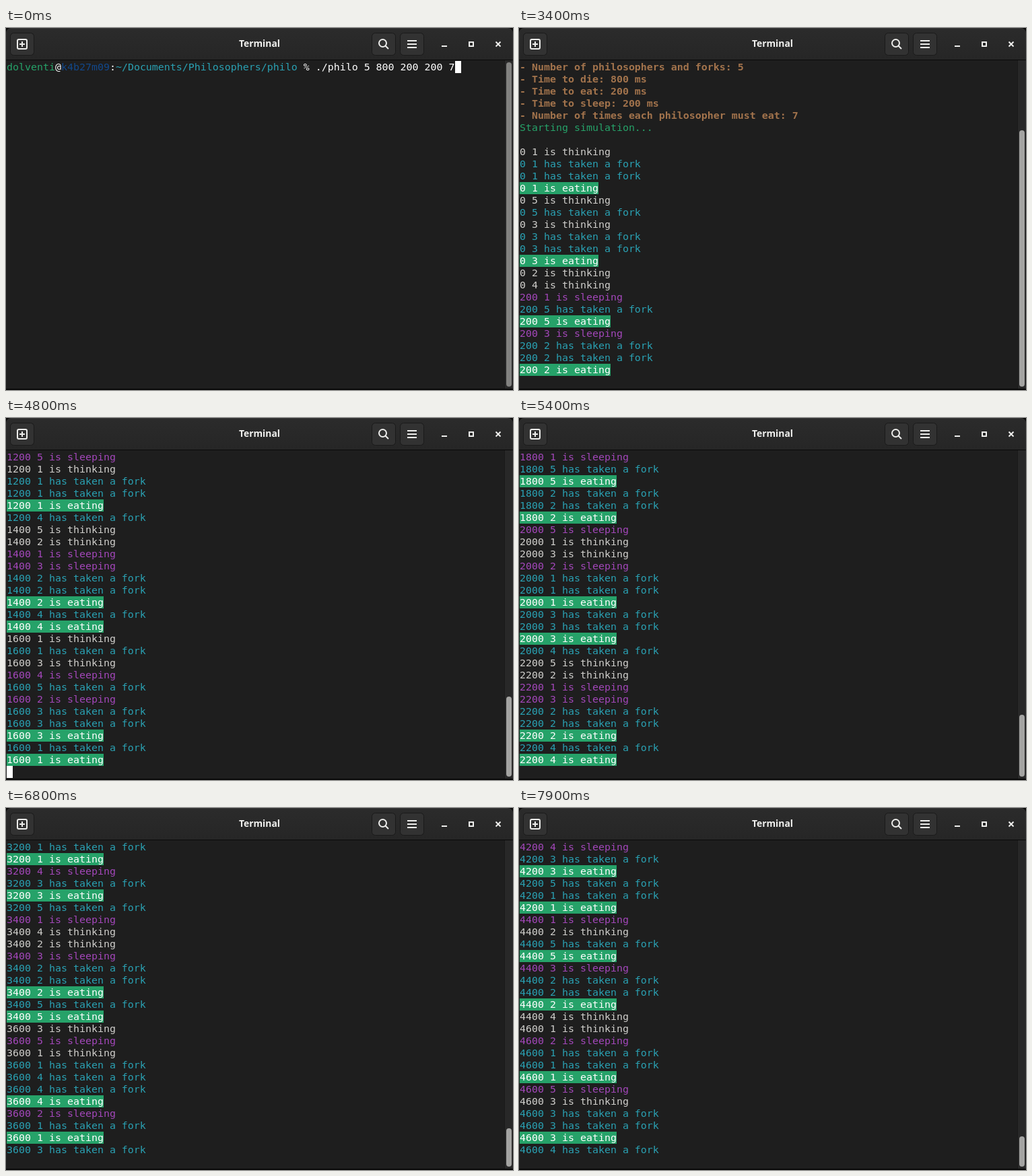
An HTML page for the animation above (8000 ms loop, 753 by 538 pixels).

```html
<!DOCTYPE html>
<html lang="en">
<head>
<meta charset="utf-8">
<title>Terminal</title>
<style>
  html, body { margin: 0; width: 100%; height: 100%; overflow: hidden; background: #000; }
  #window { position: absolute; left: 0; top: 0; width: 753px; height: 538px; overflow: hidden; background: #0a0a0a; }
  #header {
    position: absolute; left: 0; top: 0; width: 753px; height: 47px; box-sizing: border-box;
    border-top: 1px solid #373737; border-radius: 8px 8px 0 0;
    background: linear-gradient(#2b2b2b, #262626);
  }
  #title {
    position: absolute; left: 0; top: 13px; width: 753px; line-height: 20px; text-align: center;
    color: #f0f0ee; font: bold 13.9px/20px "Noto Sans", "Open Sans", sans-serif;
  }
  #icons { position: absolute; left: 0; top: 0; }
  #screen {
    position: absolute; left: 0; top: 48px; width: 740px; height: 488px; background: #1e1e1e;
  }
  #rows {
    position: absolute; left: 1px; top: 1px; white-space: pre; color: #fff;
    font: 14.95px/18px "DejaVu Sans Mono", monospace;
  }
  #rows div { height: 18px; }
  #rows span { display: inline-block; height: 18px; vertical-align: top; }
  #cursor { position: absolute; width: 9px; height: 18px; background: #fff; }
  #trough {
    position: absolute; left: 740px; top: 48px; width: 12px; height: 488px;
    background: #282828; border-left: 1px solid #1a1a1a;
  }
  #slider { position: absolute; left: 743px; bottom: 5px; width: 8px; border-radius: 4px; }
  #rows .green { color: #26a269; }
  #rows .blue { color: #12488b; }
  #rows .cyan { color: #2aa1b3; }
  #rows .magenta { color: #a347ba; }
  #rows .yellow { color: #a2734c; }
  #rows .gray { color: #d0cfcc; }
  #rows .badge { background: #26a269; color: #fff; }
  #rows .bold { font-weight: bold; }
</style>
</head>
<body>
<div id="window">
  <div id="header"></div>
  <div id="title">Terminal</div>
  <svg id="icons" width="753" height="48" fill="none" stroke="#eeeeec" stroke-width="2">
    <g fill="#323232" stroke="#1a1a1a" stroke-width="1">
      <rect x="6.5" y="7.5" width="35" height="33" rx="5"/>
      <rect x="543.5" y="7.5" width="35" height="33" rx="5"/>
      <rect x="585.5" y="7.5" width="35" height="33" rx="5"/>
    </g>
    <rect x="17" y="17" width="14" height="14" rx="2"/>
    <path d="M20 24h8M24 20v8"/>
    <circle cx="559.5" cy="22.5" r="5.5"/>
    <path d="M563.5 26.500l4.500 4.500"/>
    <path d="M596 19h14M596 24h14M596 29h14"/>
    <path d="M647 27h8"/>
    <rect x="688" y="21" width="6" height="6"/>
    <path d="M727.500 20.500l7 7M734.500 20.500l-7 7"/>
  </svg>
  <div id="screen">
    <div id="rows"></div>
    <div id="cursor"></div>
  </div>
  <div id="trough"></div>
  <div id="slider"></div>
</div>
<script>
const LOOP = 8000, BLINK = 600, ENTER = 1200, LOG_START = 3200, TICK = 200;
const ROWS = 27, CELL_W = 9, CELL_H = 18;

const $ = id => document.getElementById(id);
const styled = (style, text) => `<span class="${style}">${text}</span>`;

const command = " % ./philo 5 800 200 200 7";
const user = "dolventi", host = "k4b27m09", path = "~/Documents/Philosophers/philo";
const prompt = styled("green", user) + "@" + styled("blue", host) + ":" + styled("cyan", path) + command;
const promptLength = `${user}@${host}:${path}${command}`.length;

const rule = styled("blue", "=".repeat(46));
const banner = [
  "", rule, styled("magenta bold", "WELCOME TO THE DINING PHILOSOPHERS SIMULATION!"), rule, "",
  styled("cyan", "Details of the simulation:"),
  ...[
    "Number of philosophers and forks: 5",
    "Time to die: 800 ms",
    "Time to eat: 200 ms",
    "Time to sleep: 200 ms",
    "Number of times each philosopher must eat: 7"
  ].map(text => styled("yellow bold", "- " + text)),
  styled("green", "Starting simulation..."), ""
];

const actions = {
  t: ["gray", "is thinking"],
  f: ["cyan", "has taken a fork"],
  e: ["badge", "is eating"],
  s: ["magenta", "is sleeping"]
};

// One entry per 200 ms of the simulation: philosopher, then action.
const ticks = `
  1t1f1f1e5t5f3t3f3f3e2t4t
  1s5f5e3s2f2f2e
  5s1t4f4f4e3t2s1f1f1e3f
  5t4s3f3e1s5f5f5e2t2f
  3s4t1t5s4f4f4e1f1f1e
  3t5t1s2f2e4s5f5f5e
  2s4t3f3f3e5s1t1f1f1e4f
  5t2t1s3s2f2f2e4f4e
  1t1f3t4s5f2s3f3f3e1f1e
  4t2t3s1s5f5e2f2f2e
  5s1t3t2s1f1f1e3f3f3e4f
  5t2t1s3s2f2f2e4f4e
  1t1f4s5f3t2s3f3f3e1f1e
  2t4t1s5f5e3s2f2f2e
  5s2s3t1t1f1f1e3f3f3e4f
  5t2t1s3s2f2f2e4f4e
  1t3t2s1f3f1f1e4s3f3e5f
  1s4t2t3s2f2f2e5f5e
  3t5s1t1f4f4f4e2s1f1e3f
  2t4s3f3e1s5t5f5f5e2f
  3s1t4t2f2e5s4f4f4e
  3t2s5t3f1f4s3f3e5f1f1e
  1s2t5f5e3s2f2f2e4t
  1t2s1f1f1e5s3t3f3f3e4f`.trim().split(/\s+/);

const logTick = (tick, index) => tick.match(/../g).map(([who, key]) => {
  const [style, text] = actions[key];
  return styled(style, `${index * TICK} ${who} ${text}`);
});

const lines = [prompt, ...banner];
const lengthAfter = ticks.map((tick, i) => lines.push(...logTick(tick, i)));

function lineCount(t) {
  if (t < ENTER) return 1;
  if (t < LOG_START) return 1 + banner.length;
  return lengthAfter[Math.min(ticks.length - 1, Math.floor((t - LOG_START) / TICK))];
}

let shown = 0;
function showLines(count) {
  if (count === shown) return;
  shown = count;
  const typing = count === 1;
  const total = typing ? 1 : count + 1;
  const first = Math.max(0, total - ROWS);
  $("rows").innerHTML = lines.slice(first, count).map(line => `<div>${line}</div>`).join("");
  $("cursor").style.left = 1 + (typing ? promptLength * CELL_W : 0) + "px";
  $("cursor").style.top = 1 + (total - 1 - first) * CELL_H + "px";
  $("slider").style.height = 489 * ROWS / Math.max(ROWS, total) - 7 + "px";
}

function draw() {
  const t = performance.now() % LOOP;
  showLines(lineCount(t));
  $("cursor").style.visibility = Math.floor(t / BLINK) % 2 ? "hidden" : "visible";
  const gray = 130 + 34 * Math.min(1, Math.max(0, (t - 50) / 450));
  $("slider").style.background = `rgb(${gray}, ${gray}, ${gray - 2})`;
  requestAnimationFrame(draw);
}
draw();
</script>
</body>
</html>
```
